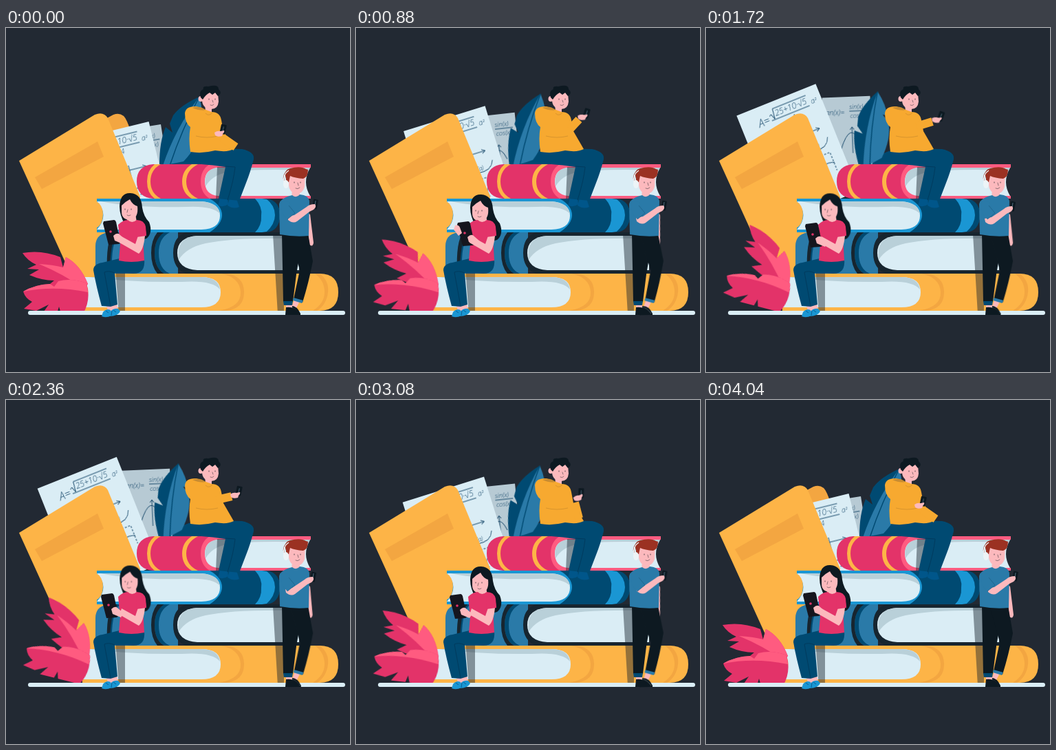
An HTML page without scripts for the animation above (4.08 s loop, 500 by 500 pixels).

```html
<!DOCTYPE html>
<html lang="en">
<head>
<meta charset="utf-8">
<title>Students and books</title>
<style>
html, body { margin: 0; width: 100%; height: 100%; overflow: hidden; background: #222933; }
svg { display: block; width: 100%; height: 100%; }
text { font: italic 300 12px "Open Sans", "Noto Sans", sans-serif; fill: #17486a; stroke: none; }
.yel { fill: #fdb447; } .amber { fill: #f3a641; } .top { fill: #f7a930; }
.red { fill: #e33369; } .rose { fill: #ff5b80; }
.navy { fill: #004a72; } .blue { fill: #2a7aa8; } .sky { fill: #1a96d3; }
.ink { fill: #0d1921; } .page { fill: #daedf5; } .dim { fill: #b9d0d9; }
.skin { fill: #fcb9bd; } .shade { fill: #16202a; opacity: .45; }
.pen { fill: none; stroke: #17486a; stroke-width: 1; }
.face { fill: none; stroke: #24242c; stroke-width: .8; stroke-linecap: round; }
.brow { stroke-width: .5; }

/* slow out-and-back motion */
.sway { animation: sway 4.08s ease-in-out infinite; }
@keyframes sway { 0%, 98%, 100% { transform: var(--a); } 49% { transform: var(--b); } }
/* twice per loop */
.bob { animation: bob 4.08s ease-in-out infinite; }
@keyframes bob { 0%, 49%, 98%, 100% { transform: none; } 24.5%, 73.5% { transform: var(--b); } }

.sheet { --a: translate(207.5px, 136px) rotate(-13.8deg); --b: translate(157.5px, 79px) rotate(-22.3deg); }
.back { --a: translate(225px, 140px) rotate(-9deg); --b: translate(239px, 97px) rotate(-2deg); }
.fern { transform-origin: 240px 200px; --a: rotate(0deg); --b: rotate(-18deg); }
.frond { transform-origin: 116px 376px; --a: rotate(0deg); --b: rotate(33deg); }
.low { transform-origin: 118px 392px; --a: rotate(0deg); --b: rotate(15deg); }
.girl { --b: translate(1px, 2px); }
.leg { transform-origin: 430px 305px; --b: rotate(-1.6deg); }
.rest { transform-origin: 438px 270px; --b: rotate(7deg); }

.phone { animation: phone 4.08s linear infinite; }
@keyframes phone {
  0%, 98%, 100% { transform: translate(309px, 154px); }
  10% { transform: translate(315px, 146px) rotate(3deg); }
  21.6% { transform: translate(328px, 130px) rotate(5deg); }
  42.2% { transform: translate(334px, 134px) rotate(8deg); }
  57.8% { transform: translate(332px, 139px); }
  75.5% { transform: translate(322px, 143px) rotate(-10deg); }
  85.3% { transform: translate(317px, 146px) rotate(-8deg); }
}
.tablet { animation: tablet 4.08s ease-in-out infinite; }
@keyframes tablet {
  0%, 98%, 100% { transform: none; }
  21.6% { transform: translate(6px, 2px); }
  42.2% { transform: translate(3px, 4px); }
  57.8% { transform: translate(-3px, 2px); }
  75.5% { transform: translate(-5px, 3px); }
  85.3% { transform: translate(-3px, 3px); }
}
.grip { animation: grip 4.08s linear infinite; }
@keyframes grip { 0%, 10%, 36%, 100% { opacity: 0; } 17%, 28% { opacity: 1; } }
.reach { transform-origin: 413px 279px; animation: reach 4.08s ease-in-out infinite; }
@keyframes reach {
  0%, 85.3%, 100% { transform: none; }
  21.6% { transform: translate(-2px, 2px); }
  42.2% { transform: translate(-4px, 3px); }
  57.8% { transform: translate(-3px, 1px); }
  75.5% { transform: translate(-1.5px, -1px); }
}
.blip { animation: blip 4.08s step-end infinite; }
@keyframes blip { 0%, 86.2% { opacity: 1; } 84.4% { opacity: 0; } }
</style>
</head>
<body>
<svg viewBox="0 0 500 500">
  <rect width="500" height="500" fill="#222933"/>

  <!-- folder and papers -->
  <path class="amber" d="M130 140L156 126Q170 121 176 136L220 245L150 245Z"/>
  <g class="sway back">
    <path fill="#b7cad4" d="M-70 0H0V115H-70Z"/>
    <text x="-69" y="26" style="font-size:10.5px">tan(x)=</text>
    <text x="-31" y="18" style="font-size:9.5px">sin(x)</text>
    <text x="-30" y="31" style="font-size:9.5px">cos(x)</text>
    <path class="pen" d="M-31 21H-5M-28 44V82M-31 48L-28 44L-25 48M-45 76Q-30 34 -18 66"/>
  </g>
  <path class="navy" d="M240 200Q252 178 282 176L282 200Z"/>
  <g class="sway fern">
    <path class="navy" d="M281 100Q254 112 243 127L238 139L242 152L232 144Q223 165 223 198L240 200Q258 150 281 100Z"/>
    <path class="blue" d="M281 100Q287 122 284 138L278 134L283 148Q279 172 258 194L228 200Q246 146 281 100Z"/>
    <path d="M281 100Q256 146 238 200" fill="none" stroke="#004a72" stroke-width="1.5"/>
  </g>
  <g class="sway sheet">
    <path class="page" d="M-124 0H0V168H-124Z"/>
    <text x="-99" y="29" style="font-size:16px">A=</text>
    <text x="-71" y="22" style="font-size:12px">25+10·√5</text>
    <text x="-16" y="25" style="font-size:10px">a²</text>
    <text x="-50" y="37" style="font-size:10px">4</text>
    <path class="pen" d="M-80 19L-77 17L-74 25L-72 10H-20M-79 26H-20M-65 62H-19M-24 59L-19 62L-24 65M-13 78Q-18 94 -40 90M-44 55V118M-17 116Q-38 108 -32 128"/>
    <path class="pen" stroke-dasharray="3 2" d="M-42 100H-18V128"/>
    <text x="-38" y="88" style="font-size:9px">(α)</text>
  </g>
  <path class="yel" d="M19 193L129 126Q142 121 148 131L195 245V360H95Z"/>
  <path class="amber" d="M42 217L133 165L142 187L52 234Z"/>

  <!-- yellow book -->
  <path class="yel" d="M111 357H456Q483 357 483 384Q483 411 456 411H111Z"/>
  <path class="page" d="M111 362H284Q312 362 312 384Q312 406 284 406H111Q128 384 111 362Z"/>
  <path class="dim" d="M120 362H284Q308 362 311 380Q300 366 255 369Q180 370 120 362Z"/>
  <path class="amber" d="M312 357H320Q346 360 346 384Q346 408 320 411H310Q342 405 341 384Q340 362 312 357ZM449 357H456Q470 368 468 384Q466 402 452 411H446Q463 400 463 384Q463 367 449 357Z"/>

  <!-- dark book -->
  <path class="blue" d="M148 297H250V357H130V317Q130 300 148 297Z"/>
  <path class="navy" d="M160 297H166Q152 310 154 357H148Q147 310 160 297ZM230 297H238Q222 305 222 327Q222 350 238 357H230Q216 349 216 327Q216 305 230 297Z"/>
  <path fill="#17252f" d="M156 297H162Q151 310 151 357H147Q145 309 156 297ZM220 297H230Q216 306 216 327Q216 349 230 357H220Q211 346 211 327Q211 308 220 297ZM262 297H427V302H278V352H427V357H262Q243 350 243 327Q243 303 262 297Z"/>
  <path class="page" d="M278 302H426V352H278Q249 350 249 327Q249 304 278 302Z"/>
  <path class="dim" d="M278 302H426V306Q330 304 290 313Q262 319 251 337Q246 304 278 302Z"/>

  <!-- blue book -->
  <path class="sky" d="M132 248H372Q398 250 398 272Q398 295 372 297H132Z"/>
  <path class="navy" d="M296 248H362Q373 260 371 273Q372 287 362 297H296Q314 285 314 272Q314 258 296 248ZM378 248Q398 250 398 272Q398 295 378 297Q391 285 391 272Q391 258 378 248Z"/>
  <path class="page" d="M132 252H284Q311 254 311 273Q311 292 284 293H132Q151 272 132 252Z"/>
  <path class="dim" d="M137 252H284Q309 254 311 270Q300 258 262 260Q190 262 137 252Z"/>
  <path class="yel" d="M130 251Q141 257 141 271Q141 286 130 292Z"/>

  <!-- red book -->
  <path class="red" d="M214 198H443V203H300V244H443V248H214Q190 246 190 223Q190 200 214 198Z"/>
  <path class="rose" d="M296 198H443V203H308Q296 224 308 244H443V248H296Q283 240 283 223Q283 206 296 198Z"/>
  <path class="yel" d="M216 198H225Q210 206 210 223Q210 240 225 248H216Q205 240 205 223Q205 207 216 198ZM270 198H279Q262 207 262 223Q262 240 279 248H270Q256 240 256 223Q256 207 270 198Z"/>
  <path class="page" d="M308 203H442Q430 224 442 244H308Q289 242 289 223Q289 205 308 203Z"/>
  <path class="dim" d="M308 203H442L440 207Q360 204 320 210Q300 214 290 230Q286 205 308 203Z"/>

  <path class="shade" d="M307 202H321L316 248H305ZM159 350H173V416H164ZM388 300H404V416H395Z"/>

  <!-- pink leaves -->
  <g class="sway frond">
    <path class="red" d="M24 327Q52 322 79 333L83 348L87 333Q108 344 119 372L112 382Q85 382 58 377L70 367Q52 367 34 359L48 351L31 350L44 344Q31 338 24 327Z"/>
    <path class="rose" d="M48 343Q68 344 83 348L87 333Q108 344 119 372L112 378Q84 358 48 343Z"/>
  </g>
  <g class="sway low">
    <path class="red" d="M25 383Q42 373 64 372L70 376L76 368Q96 363 117 371Q124 395 112 415H80L77 405L74 415H53L62 402L44 411L26 408L38 398Q28 393 25 383Z"/>
    <path class="rose" d="M25 383Q42 373 64 372L70 376L76 368Q96 363 117 371L119 384Q70 374 25 383Z"/>
  </g>
  <rect class="page" x="32" y="411" width="461" height="6" rx="3"/>

  <!-- man on top -->
  <path fill="#00568a" d="M311 247H322L323 256Q317 261 308 258ZM325 248H335L339 260Q331 264 322 258Z"/>
  <path class="navy" d="M269 180Q300 174 343 176Q362 180 360 191Q355 210 349 225L339 251L309 248L319 202Q300 199 284 198Q267 196 269 180Z"/>
  <path d="M322 250Q331 222 333 202L319 201" fill="none" stroke="#003b5e" stroke-width="1"/>
  <path class="skin" d="M289 111H299V122Q295 128 290 121Z"/>
  <path class="top" d="M260 124Q261 113 277 114L299 122Q311 122 313 134L316 150L331 176Q322 181 304 178Q285 183 268 180Q265 160 268 144Q260 138 260 124Z"/>
  <path fill="#c98c31" d="M271 116Q281 112 290 119Q282 121 271 116Z"/>
  <path d="M290 124Q295 129 300 123M276 157Q292 161 308 157" fill="none" stroke="#d9952d" stroke-width="1"/>
  <g transform="translate(0 1)">
    <ellipse class="skin" cx="283" cy="102" rx="3.5" ry="4"/>
    <path class="skin" d="M285 95Q297 88 308 94L309 106Q308 117 298 117Q286 116 285 105Z"/>
    <path class="ink" d="M283 100Q280 90 287 88Q285 83 294 84Q309 80 309 88Q315 94 308 98L304 93L300 96L296 93Q290 96 286 103Z"/>
    <path class="face" d="M295 102V103M304 102V103"/>
    <path class="face brow" d="M300 104L301 107M297 111Q300 113 302 110"/>
  </g>
  <path fill="none" stroke="#f7a930" stroke-width="12" stroke-linejoin="round" d="M334 173L314 159">
    <animate attributeName="d" dur="4.08s" repeatCount="indefinite" keyTimes="0;.1;.216;.422;.578;.755;.853;.98;1"
      values="M334 173L314 159;M324 168L317 150;M311 147L324 133;M306 143L329 136;M306 145L328 140;M324 172L318 149;M332 173L317 151;M334 173L314 159;M334 173L314 159"/>
  </path>
  <g class="phone">
    <rect class="ink" x="1" y="-15" width="8" height="14" rx="1" transform="rotate(12)"/>
    <path d="M5 -12V-5" stroke="#466071" stroke-width="1" transform="rotate(12)"/>
    <path class="skin" d="M-6 -2Q-2 -5 3 -4L8 -5Q9 -3 6 0L5 3Q-2 5 -5 2Z"/>
  </g>

  <!-- girl -->
  <path class="skin" d="M143 398H161L163 412H149Z"/>
  <path class="sky" d="M141 413Q146 407 152 410L153 418Q146 422 139 419ZM152 412Q156 407 163 408L166 412Q162 419 151 419Z"/>
  <path d="M153 418L154 411M145 411L149 414M156 410L160 413" fill="none" stroke="#0b5f93"/>
  <path class="navy" d="M165 335L201 336Q203 357 185 357L158 356L162 402L152 405L139 404Q131 375 127 352Q127 343 140 341Z"/>
  <path d="M158 356Q149 352 143 355L152 404" fill="none" stroke="#003b5e" stroke-width="1"/>
  <g class="bob girl">
    <path class="ink" d="M165 259Q166 239 181 240Q197 241 198 261Q200 274 208 282Q214 298 204 306Q193 310 187 298L173 286Q165 272 165 259Z"/>
    <path class="skin" d="M176 270H188L190 282Q182 289 176 281Z"/>
    <path class="skin" d="M168 258Q174 252 180 249Q184 257 191 259Q193 276 181 279Q168 279 168 267Z"/>
    <path class="face" d="M173 263V264M182 263V264"/>
    <path class="face brow" d="M177 264L176 268M176 272Q178 274 181 272"/>
  </g>
  <path class="red" d="M163 286Q170 279 177 279Q183 285 190 279Q201 279 203 289L204 301L199 304L201 338Q182 342 164 338L166 315Z"/>
  <g class="tablet">
    <path fill="#15161e" d="M142 281L157 279Q159 279 160 282L166 311Q166 314 163 314L149 315L141 284Z"/>
    <path class="skin grip" d="M136 291L138 285Q143 283 145 288L148 296L143 300Z"/>
    <circle class="red" cx="152" cy="296" r="1.8"/>
    <path class="skin" d="M156 302Q162 296 166 301L174 308L170 314L158 309Z"/>
  </g>
  <path class="skin" d="M192 302L202 302Q200 322 193 328L165 312L168 303L188 314Z"/>
  <path class="red" d="M190 286H202L204 302L189 304Z"/>

  <!-- young man with headphones -->
  <path class="skin rest bob" d="M437 268L442 271L447 312Q446 319 441 315L438 290Z"/>
  <path class="ink" d="M401 299H432L422 358L417 398H403Z"/>
  <g class="bob leg">
    <path class="skin" d="M419 395H428L421 409H414Z"/>
    <path class="ink" d="M412 404Q422 402 428 415V417H409Z"/>
    <path d="M411 405Q420 406 426 415" fill="none" stroke="#5d6a72" stroke-width=".7"/>
    <path class="ink" d="M412 299H439L446 339Q440 370 431 399L418 394L427 352Z"/>
    <path class="blue" d="M418 392L432 396L430 400L417 396Z"/>
  </g>
  <path class="navy" d="M403 397H417L416 403H404Z"/>
  <path class="skin" d="M407 403H416V408H407Z"/>
  <path class="ink" d="M407 406Q418 404 426 413V417H406Z"/>
  <path class="skin" d="M416 233H427V247H415Z"/>
  <path class="blue" d="M416 243Q422 248 427 242Q440 243 441 252L440 302Q420 304 398 300L397 256Q399 247 416 243Z"/>
  <path class="skin" d="M411 212Q424 207 435 213L434 231Q431 242 421 240Q412 239 411 229Z"/>
  <path fill="#9b3122" d="M407 219Q403 207 413 204Q428 200 436 205L439 206Q439 217 432 219Q420 218 413 215L411 224H407Z"/>
  <path d="M410 206Q402 213 404 222" fill="none" stroke="#9b3122" stroke-width="1.5"/>
  <g class="blip">
    <path d="M411 207Q402 213 404 224" fill="none" stroke="#edf4f7" stroke-width="1.5"/>
    <ellipse cx="407" cy="227" rx="4" ry="6" fill="#edf4f7"/>
    <path class="face" d="M419 224V225M428 224V225"/>
    <path class="face brow" d="M424 225L425 229M421 233Q424 235 427 232"/>
  </g>
  <g class="reach">
    <rect class="ink" x="446" y="249" width="7" height="14" rx="1" transform="rotate(10 449 256)"/>
    <path d="M450 251L449 258" stroke="#526b7c"/>
    <path class="skin" d="M409 274L419 272L437 260Q441 256 449 256Q452 260 447 264L441 267L423 281Q417 285 410 279Z"/>
  </g>
  <path class="blue" d="M398 252L411 253L420 269L409 278Q401 271 398 260Z"/>
  <path d="M411 258L420 269L409 278" fill="none" stroke="#1f628a" stroke-width=".8"/>
</svg>
</body>
</html>
```
